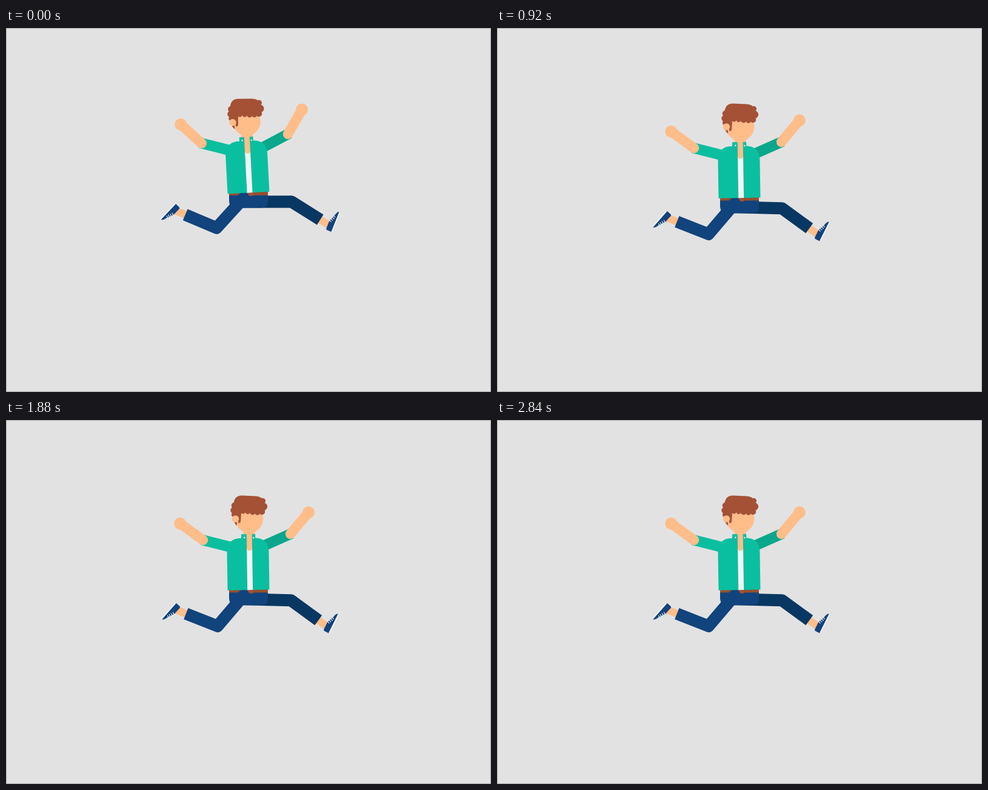
Recreate the animation shown at these times as an HTML page. Size 800x600 px, loop 2.88 s.

```html
<!DOCTYPE html>
<html lang="en">
<head>
<meta charset="utf-8">
<title>Running man</title>
<style>
html, body { margin: 0; width: 100%; height: 100%; overflow: hidden; background: #e2e2e2; }
svg { display: block; width: 100vw; height: 100vh; }
</style>
</head>
<body>
<svg viewBox="0 0 800 600">
  <rect x=".5" y=".5" width="799" height="599" fill="#e2e2e2" stroke="#a3a3a3"/>
  <g id="man"></g>
</svg>
<script>
const CYCLE = 960, STEP = 40;
const SKIN = '#ffbd8a', HAIR = '#a45136', SHIRT = '#0abf9f', SLEEVE = '#09a78c',
      NAVY = '#11437d', DARK = '#083762', WHITE = '#f3f5f6', BELT = '#96502f';

// Limb poses over one stride; angles in degrees from straight down, forward positive
const KEYS = [20, 140, 260, 360, 440, 500, 620, 740, 840, 920];
const POSE = {
  thigh: [-46.5, -5, 54, 78.2, 88.5, 90.5, 50, 2, -26, -44],
  reach: [62, 66, 72, 76, 78, 79, 74, 66, 58.5, 62],
  shin: [-113, -95, -38, 23, 54, 58.5, 42, -8, -88, -111.5],
  flex: [21, 15, 0, -11.5, -9.5, -11, -8, 0, 3, 20],
  upper: [-104, -55, 17, 80, 113.8, 118.5, 50, -52, -88, -104],
  fore: [-133, -75, 35, 87, 140, 152, 85, 0, -75, -126]
};

// Periodic monotone cubic through the key poses
function sample(name, time) {
  const v = POSE[name], n = v.length;
  const u = ((time - KEYS[0]) % CYCLE + CYCLE) % CYCLE + KEYS[0];
  const at = i => v[(i + n) % n];
  const key = i => KEYS[(i + n) % n] + Math.floor(i / n) * CYCLE;
  const slope = i => (at(i + 1) - at(i)) / (key(i + 1) - key(i));
  const tangent = i => {
    const a = slope(i - 1), b = slope(i);
    return a * b > 0 ? 2 * a * b / (a + b) : 0;
  };
  let i = n - 1;
  while (u < key(i)) i--;
  const h = key(i + 1) - key(i), s = (u - key(i)) / h, r = 1 - s;
  return at(i) * (1 + 2 * s) * r * r + at(i + 1) * (3 - 2 * s) * s * s
    + h * s * r * (tangent(i) * r - tangent(i + 1) * s);
}

const rad = deg => deg * Math.PI / 180;
const wave = (time, peak, period) => Math.cos(2 * Math.PI * (time - peak) / period);
const polar = (p, deg, len) => [p[0] + len * Math.sin(rad(deg)), p[1] + len * Math.cos(rad(deg))];
const points = list => list.map(p => p.map(c => c.toFixed(2)).join()).join(' ');
const line = (list, color, width, cap = 'butt') =>
  `<polyline points="${points(list)}" fill="none" stroke="${color}" stroke-width="${width}" stroke-linejoin="round" stroke-linecap="${cap}"/>`;
const dot = (x, y, r, color) => `<circle cx="${x}" cy="${y}" r="${r}" fill="${color}"/>`;
const box = (x, y, w, h, color, extra = '') =>
  `<rect x="${x}" y="${y}" width="${w}" height="${h}" fill="${color}" ${extra}/>`;
const shape = (d, color) => `<path d="${d}" fill="${color}"/>`;
const group = (x, y, deg, body) =>
  `<g transform="translate(${x} ${y}) rotate(${deg})">${body}</g>`;

const SHOE =
  shape('M-8.5 7.5V-1Q-8.5-3-6-3H7L19 2Q27 3.5 27 7.5Z', NAVY) +
  shape('M-8.5 6.6H27.2V8.4H-8.5Z', WHITE) +
  '<path d="M8-3.2l-1.6 4M11.2-1.9l-1.6 4M14.4-.6l-1.6 4M17.4.7l-1.4 3.4" stroke="#f3f5f6" stroke-width="1.2"/>';

function leg(u, base, hipLift, color) {
  const shin = sample('shin', u);
  const hip = [392, base - hipLift];
  const knee = polar([392, base - 10], sample('thigh', u), sample('reach', u));
  const cuff = polar(knee, shin, 56), ankle = polar(knee, shin, 74);
  return line([polar(knee, shin, 50), ankle], SKIN, 12.5) +
    group(ankle[0], ankle[1], sample('flex', u) - shin, SHOE) +
    dot(hip[0], hip[1], 10, color) +
    line([hip, knee, cuff], color, 20);
}

function arm(u, shoulder, color) {
  const upper = sample('upper', u), fore = sample('fore', u);
  const elbow = polar(shoulder, upper, 59.5), hand = polar(elbow, fore, 46.5);
  return line([shoulder, polar(elbow, upper, 2)], color, 17.5) +
    line([elbow, hand], SKIN, 16.5, 'round') +
    dot(hand[0], hand[1], 10, SKIN);
}

const CURLS = [
  [21, -31, 4.5], [22.5, -21.5, 6.5], [20.5, -13, 5], [13, -11.5, 4.5], [5, -11.5, 4.5],
  [-3, -12, 4.2], [-11, -12.5, 4.5], [-25.5, -21, 5], [-26.5, -13, 5], [-25.5, -6, 4]
].map(c => dot(...c, HAIR)).join('');

function head(turn) {
  const s = 8 * turn;
  return dot(0, 0, 23, SKIN) +
    shape(`M-28-14L-26 2Q-24 9-20 12L${s - 20} 4H${s - 18}V7.5H${s - 16}Q${s - 14} 7 ${s - 14} 2V-14Z`, HAIR) +
    shape('M-27-10V-22Q-27-38-13-38H9Q19-38 22-31L25-13H-12Z', HAIR) +
    CURLS + dot(s - 23, 1, 5.8, SKIN);
}

function torso(turn) {
  const open = 2 + 18 * turn, left = -10.5 - 3 * turn, right = 12.2 + 10 * turn;
  const wide = 9 - 2 * turn, top = -93 + 13 * turn, x = open - wide / 2;
  return box(-7, -108, 19, 22, SKIN) +
    shape('M-34.5 0V-62Q-34.5-85.5-11-85.5H11Q34.5-85.5 34.5-62V0Z', SHIRT) +
    box(left, -92, right - left, 10, SHIRT) +
    box(x, -70, wide, 70, WHITE) +
    shape(`M${x} ${top}H${x + wide}V-69Q${x + wide}-64.5 ${open}-64.5T${x}-69Z`, SKIN) +
    dot(-6 + 17 * turn, -86.5, 1.2, WHITE) + dot(9.2 + 12 * turn, -86, 1.2, WHITE);
}

function pelvis(base, turn) {
  const buckle = 402.5 + 19 * turn;
  return shape(`M368 ${base - 29}H432V${base - 11}Q432 ${base} 421 ${base}H380Q368 ${base} 368 ${base - 12}Z`, NAVY) +
    box(368, base - 29, 64, 4, DARK) +
    box(368, base - 26.5, 64, 5.8, BELT) +
    `<ellipse cx="${buckle}" cy="${base - 22}" rx="6" ry="2.8" fill="${HAIR}"/>`;
}

function draw(t) {
  const base = 328.7 - 33.3 * wave(t, 20, 480);
  const lean = 4.8 - 8.07 * wave(t, 20, 480);
  const nod = 9.5 - 11 * wave(t, 30, 480);
  const turn = (1 - wave(t, 20, CYCLE)) / 2;
  const far = t + CYCLE / 2, waist = base - 25;
  const onTorso = (x, y) => {
    const c = Math.cos(rad(lean)), s = Math.sin(rad(lean));
    return [400 + x * c - y * s, waist + x * s + y * c];
  };
  const face = onTorso(3, -117);
  return arm(far, onTorso(16 - 6 * turn, -68), SLEEVE) +
    leg(far, base, 10, DARK) +
    pelvis(base, turn) +
    leg(t, base, 16, NAVY) +
    group(400, waist, lean, torso(turn)) +
    group(face[0], face[1], nod, head(turn)) +
    arm(t, onTorso(-16 - 6 * turn, -68), SHIRT);
}

const man = document.getElementById('man');
const start = performance.now();
let shown = -1;
function tick() {
  const step = Math.floor((performance.now() - start) / STEP) % (CYCLE / STEP);
  if (step !== shown) {
    shown = step;
    man.innerHTML = draw(step * STEP);
  }
  requestAnimationFrame(tick);
}
tick();
</script>
</body>
</html>
```
